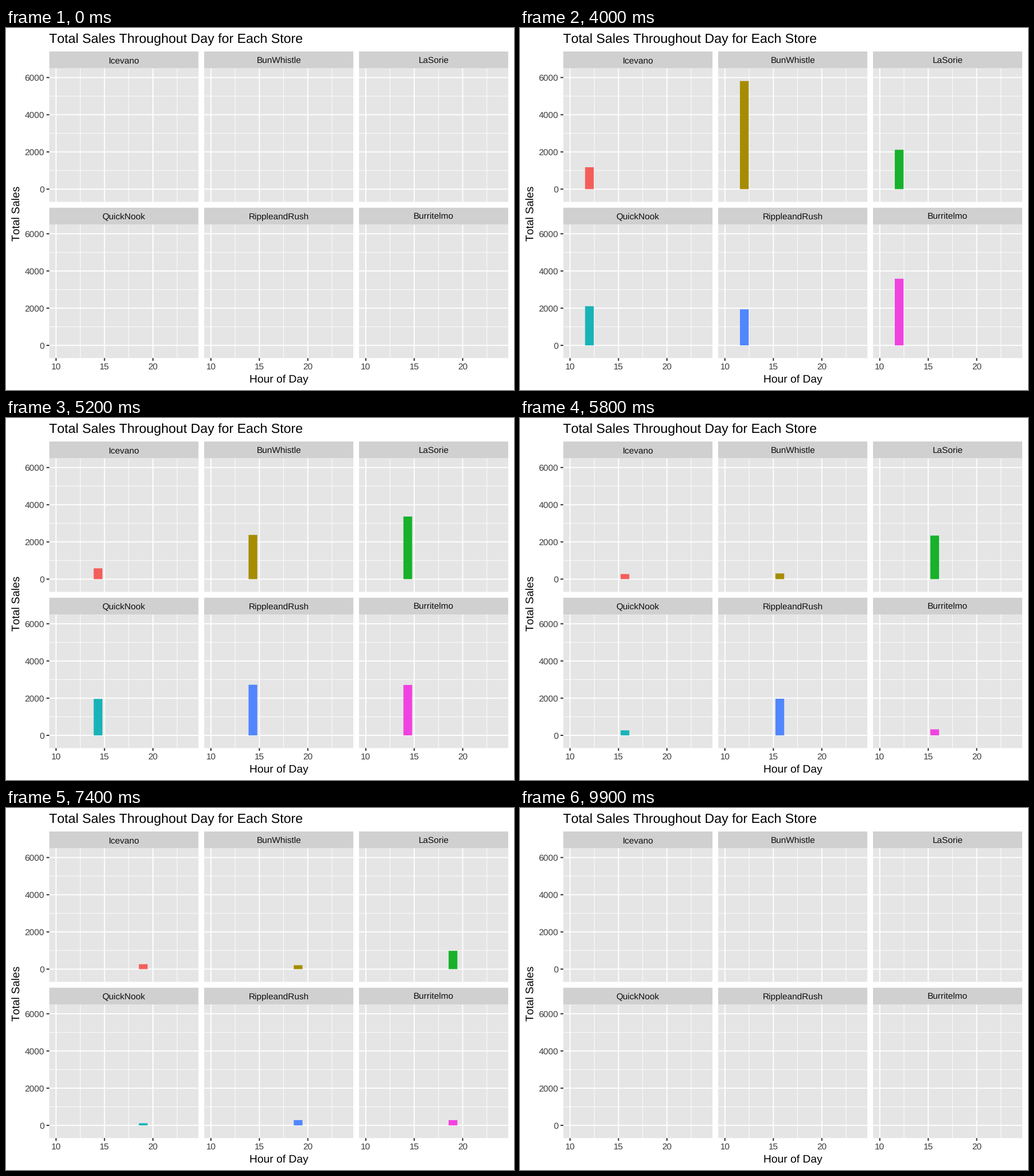
Write a matplotlib script that moves like this. It is 885 px wide and 632 px high and loops after 10 s.

```python
import numpy as np
import matplotlib.pyplot as plt
from matplotlib.animation import FuncAnimation
from matplotlib.patches import Rectangle

plt.rcParams.update({
    "font.family": "Liberation Sans",
    "text.hinting": "none",
    "text.kerning_factor": 6,
})

W, H, DPI = 885, 632, 100
PT = 72 / DPI  # points per pixel

# Panel layout in pixels, y pointing down
LEFT, PANEL_W, COL_STEP = 75.4, 259.9, 269.8
STRIP_TOP, PANEL_TOP, PANEL_BOTTOM, ROW_STEP = 41, 70.5, 303.5, 272.8
X10, HOUR_W = 87.2, 16.88
Y0, UNIT = 281.3, 0.03247
BAR_W = 0.9 * HOUR_W
MAJOR, MINOR = 1.87, 0.93
TICK, LABEL_GAP = 4.8, 8.7

PANEL, STRIP = "#e5e5e5", "#d0d0d0"
TICK_COLOR, AXIS_TEXT, STRIP_TEXT = "#222222", "#3a3a3a", "#0e0e0e"

FRAMES, INTERVAL = 100, 100
SHOW, HIDE = 35, 99
FIRST_HOUR, LAST_HOUR = 11, 23
MOVE_LEN = 3

# Name, colour, lunch arch (height, hour, rise, fall),
# later bumps (height, hour, width)
STORES = [
    ("Icevano", "#f35e5a", (1300, 12.6, 1.89, 2.04), [(395, 17.3, 2.7)]),
    ("BunWhistle", "#a68c00", (6400, 12.59, 1.937, 2.05), [(420, 17, 2.4)]),
    ("LaSorie", "#17b12b", (3510, 13.9, 3.015, 3.13), [(1030, 19.4, 1.9)]),
    ("QuickNook", "#18b3b7", (2950, 13.2, 2.244, 2.12),
     [(-380, 17, 0.5), (200, 20.5, 2)]),
    ("RippleandRush", "#5086ff", (2915, 13.5, 2.59, 3.61), [(680, 17.6, 1.5)]),
    ("Burritelmo", "#f042df", (4610, 12.9, 1.907, 2.35), [(370, 20.3, 2.5)]),
]


def hourly_sales(hour, lunch, bumps):
    height, peak, rise, fall = lunch
    reach = rise if hour < peak else fall
    total = height * max(0, 1 - ((hour - peak) / reach) ** 2)
    return total + sum(h * np.exp(-((hour - c) / w) ** 2) for h, c, w in bumps)


def sales_at(hour, lunch, bumps):
    """Blend linearly between whole hours."""
    start = int(hour)
    t = hour - start
    return ((1 - t) * hourly_sales(start, lunch, bumps)
            + t * hourly_sales(start + 1, lunch, bumps))


def hour_at(frame):
    # Moves begin every five frames; the first three run slightly ahead.
    moves = np.arange(LAST_HOUR - FIRST_HOUR) * 5 + 37
    moves[:3] += 1
    done = np.clip((frame - moves + 1) / MOVE_LEN, 0, 1)
    return FIRST_HOUR + round(done.sum(), 6)


fig = plt.figure(figsize=(W / DPI, H / DPI), dpi=DPI, facecolor="white")
ax = fig.add_axes([0, 0, 1, 1])
ax.set_xlim(0, W)
ax.set_ylim(H, 0)
ax.axis("off")


def box(x0, y0, x1, y1, color, z=1):
    return ax.add_patch(Rectangle((x0, y0), x1 - x0, y1 - y0, facecolor=color,
                                  lw=0, snap=False, zorder=z))


def line(xs, ys, width, color="white"):
    ax.plot(xs, ys, color=color, lw=width * PT, snap=False,
            solid_capstyle="butt")


def label(x, y, text, size, color="black", ha="center", **kw):
    ax.text(x, y, text, fontsize=size * PT, color=color, ha=ha,
            va="baseline", **kw)


def hour_x(hour, col):
    return X10 + (hour - 10) * HOUR_W + col * COL_STEP


def sales_y(value, row):
    return Y0 - value * UNIT + row * ROW_STEP


def draw_panel(row, col, name):
    x0 = LEFT + col * COL_STEP
    x1 = x0 + PANEL_W
    top, bottom = PANEL_TOP + row * ROW_STEP, PANEL_BOTTOM + row * ROW_STEP
    strip_top = STRIP_TOP + row * ROW_STEP
    box(x0, strip_top, x1, top, STRIP)
    box(x0, top, x1, bottom, PANEL)
    label((x0 + x1) / 2, strip_top + 20.4, name, 15.4, STRIP_TEXT)

    for width, first_hour, first_value in [(MINOR, 12.5, 1000), (MAJOR, 10, 0)]:
        for value in range(first_value, 6001, 2000):
            line([x0, x1], [sales_y(value, row)] * 2, width)
        for hour in np.arange(first_hour, 24, 5):
            line([hour_x(hour, col)] * 2, [top, bottom], width)

    if col == 0:
        for value in range(0, 6001, 2000):
            y = sales_y(value, row)
            line([x0 - TICK, x0], [y, y], MAJOR, TICK_COLOR)
            label(x0 - LABEL_GAP, y + 5.5, str(value), 15.4, AXIS_TEXT,
                  ha="right")
    if row == 1:
        for hour in range(10, 21, 5):
            x = hour_x(hour, col)
            line([x, x], [bottom, bottom + TICK], MAJOR, TICK_COLOR)
            label(x, bottom + 20, str(hour), 15.4, AXIS_TEXT)


bars = []
for i, (name, color, *_) in enumerate(STORES):
    draw_panel(*divmod(i, 3), name)
    bars.append(box(0, 0, 0, 0, color, z=3))

label(LEFT, 26.5, "Total Sales Throughout Day for Each Store", 23.1, ha="left")
label(475.2, 618.6, "Hour of Day", 19.25)
label(23.6, 323.5, "Total Sales", 19.25, rotation=90, rotation_mode="anchor")


def update(frame):
    hour = hour_at(frame)
    for i, (bar, (_, _, lunch, bumps)) in enumerate(zip(bars, STORES)):
        row, col = divmod(i, 3)
        base = sales_y(0, row)
        top = sales_y(sales_at(hour, lunch, bumps), row)
        bar.set_bounds(hour_x(hour, col) - BAR_W / 2, base, BAR_W, top - base)
        bar.set_visible(SHOW <= frame < HIDE)
    return bars


anim = FuncAnimation(fig, update, frames=FRAMES, interval=INTERVAL,
                     repeat=True, repeat_delay=0, blit=False)
plt.show()
```
